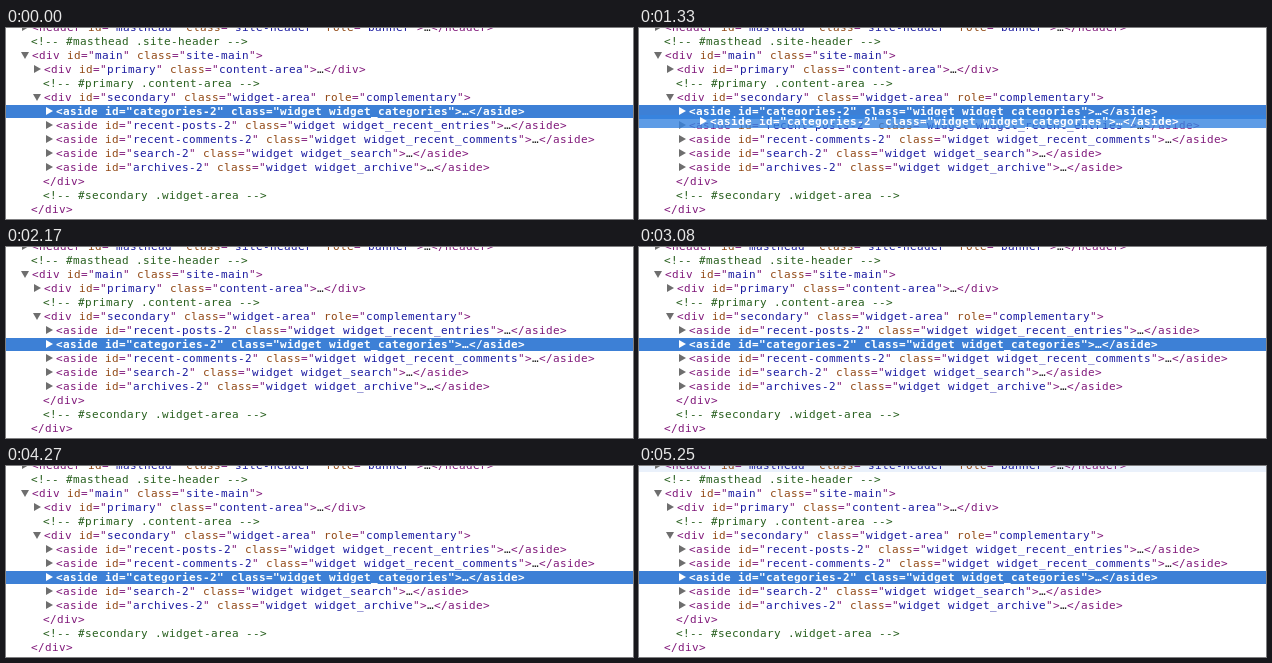
Recreate the animation shown at these times as an HTML page with a canvas. Size 627 px wide and 191 px high, loop 5.67 s.

```html
<!DOCTYPE html>
<html lang="en">
<head>
<meta charset="utf-8">
<title>Reordering nodes in an element tree</title>
<style>
  html, body { margin: 0; width: 100%; height: 100%; overflow: hidden; background: #fff; }
  canvas { display: block; }
</style>
</head>
<body>
<canvas id="stage" width="627" height="191"></canvas>
<script>
const ctx = document.getElementById('stage').getContext('2d');
const W = 627, H = 191, ROW = 14, BAR = 13, TOP = -7, CHAR = 7, LOOP = 5670, TICK = 70;
const FONT = '11px Menlo, "DejaVu Sans Mono", monospace';
const BLUE = 'rgb(61,128,214)', GHOST = 'rgba(54,132,224,0.8)', HOVER = 'rgba(56,121,217,0.1)';
const TAG = 'rgb(128,24,122)', NAME = 'rgb(145,72,20)', VALUE = 'rgb(26,26,160)';
const COMMENT = 'rgb(38,94,28)', ARROW = '#6e6e6e';

const node = (depth, text, arrow) => ({ x: 25 + depth * 12, text, arrow });
const widget = (id, name) =>
  node(2, `<aside id="${id}-2" class="widget widget_${name}">…</aside>`, 'closed');

const categories = widget('categories', 'categories');
const posts = widget('recent-posts', 'recent_entries');
const comments = widget('recent-comments', 'recent_comments');
const before = [
  node(0, '<header id="masthead" class="site-header" role="banner">…</header>', 'closed'),
  node(0, '<!-- #masthead .site-header -->'),
  node(0, '<div id="main" class="site-main">', 'open'),
  node(1, '<div id="primary" class="content-area">…</div>', 'closed'),
  node(1, '<!-- #primary .content-area -->'),
  node(1, '<div id="secondary" class="widget-area" role="complementary">', 'open')
];
const after = [
  widget('search', 'search'),
  widget('archives', 'archive'),
  node(1, '</div>'),
  node(1, '<!-- #secondary .widget-area -->'),
  node(0, '</div>')
];

// path: [time, dx, dy] of the ghost relative to the selected row
const GRAB = 8; // pointer height inside the row when a drag starts
const drags = [
  { start: 1330, end: 2030, drop: 2170,
    path: [[1330, 21, 10], [1400, 30, 15], [1470, 38, 19], [1540, 44, 22], [1610, 46, 23]] },
  { start: 3150, end: 4130, drop: 4270,
    path: [[3150, 13, 6], [3220, 26, 11], [3290, 37, 15], [3360, 44, 18], [3430, 48, 19],
           [3640, 48, 19], [3850, 47, 21]] }
];

// [time, hovered row]; -1 means none is tinted
const hovers = [[0, -1], [350, 1], [420, 3], [490, 5], [560, -1], [2520, 8], [2590, -1],
  [4830, 9], [4900, 7], [4970, 5], [5040, 3], [5110, 1], [5250, 0]];

const rowTop = i => TOP + i * ROW;

function bar(x, y, h, color) {
  ctx.fillStyle = color;
  ctx.fillRect(x, y, W - x, h);
}

function triangle(kind, x, y, color) {
  const p = kind === 'open'
    ? [[x - 10, y + 3], [x - 2, y + 3], [x - 6, y + 10]]
    : [[x - 9, y + 2], [x - 2, y + 6], [x - 9, y + 10]];
  ctx.fillStyle = color;
  ctx.beginPath();
  p.forEach(([px, py]) => ctx.lineTo(px, py));
  ctx.fill();
}

// Splits markup into coloured runs.
function runs(text) {
  if (text.startsWith('<!--')) return [[text, COMMENT]];
  return text.split(/(\w+(?==")|(?<==")[^"]*|…)/).map((s, i, all) => {
    if (i % 2 === 0) return [s, TAG];
    if (s === '…') return [s, '#222'];
    return [s, all[i + 1].startsWith('=') ? NAME : VALUE];
  });
}

function drawNode({ x, text, arrow }, y, dx = 0, selected = false) {
  x += dx;
  if (arrow) {
    triangle(arrow, x, y, selected ? '#fff' : ARROW);
    x += 1;
  }
  ctx.font = (selected ? 'bold ' : '') + FONT;
  for (const [run, color] of runs(text)) {
    ctx.fillStyle = selected ? '#fff' : color;
    for (const c of run) {
      ctx.fillText(c, x, y + 10);
      x += CHAR;
    }
  }
}

function along(path, t) {
  const i = path.findIndex(p => p[0] > t);
  if (i < 0) return path[path.length - 1].slice(1);
  const [a, b] = [path[i - 1], path[i]];
  const k = (t - a[0]) / (b[0] - a[0]);
  return [1, 2].map(j => Math.round(a[j] + (b[j] - a[j]) * k));
}

function draw(t) {
  ctx.fillStyle = '#fff';
  ctx.fillRect(0, 0, W, H);

  const moved = drags.filter(d => t >= d.drop).length;
  const widgets = [posts, comments];
  widgets.splice(moved, 0, categories);
  const selectedRow = before.length + moved;
  const hovered = hovers.filter(h => h[0] <= t).pop()[1];

  if (hovered >= 0) bar(0, rowTop(hovered), BAR, HOVER);
  bar(0, rowTop(selectedRow), BAR, BLUE);
  [...before, ...widgets, ...after].forEach((n, i) =>
    drawNode(n, rowTop(i), 0, i === selectedRow));

  const drag = drags.find(d => t >= d.start && t < d.drop);
  if (!drag) return;
  const [dx, dy] = along(drag.path, t);
  const target = selectedRow + Math.floor((dy + GRAB) / ROW);
  if (target > selectedRow) bar(0, rowTop(target) - 2, 2, BLUE);
  if (t < drag.end) {
    const y = rowTop(selectedRow) + dy;
    bar(dx - 29, y, BAR, GHOST);
    drawNode(categories, y, dx, true);
  }
}

const begin = performance.now();
function frame() {
  const t = (performance.now() - begin) % LOOP;
  draw(Math.floor(t / TICK) * TICK);
  requestAnimationFrame(frame);
}
frame();
</script>
</body>
</html>
```
